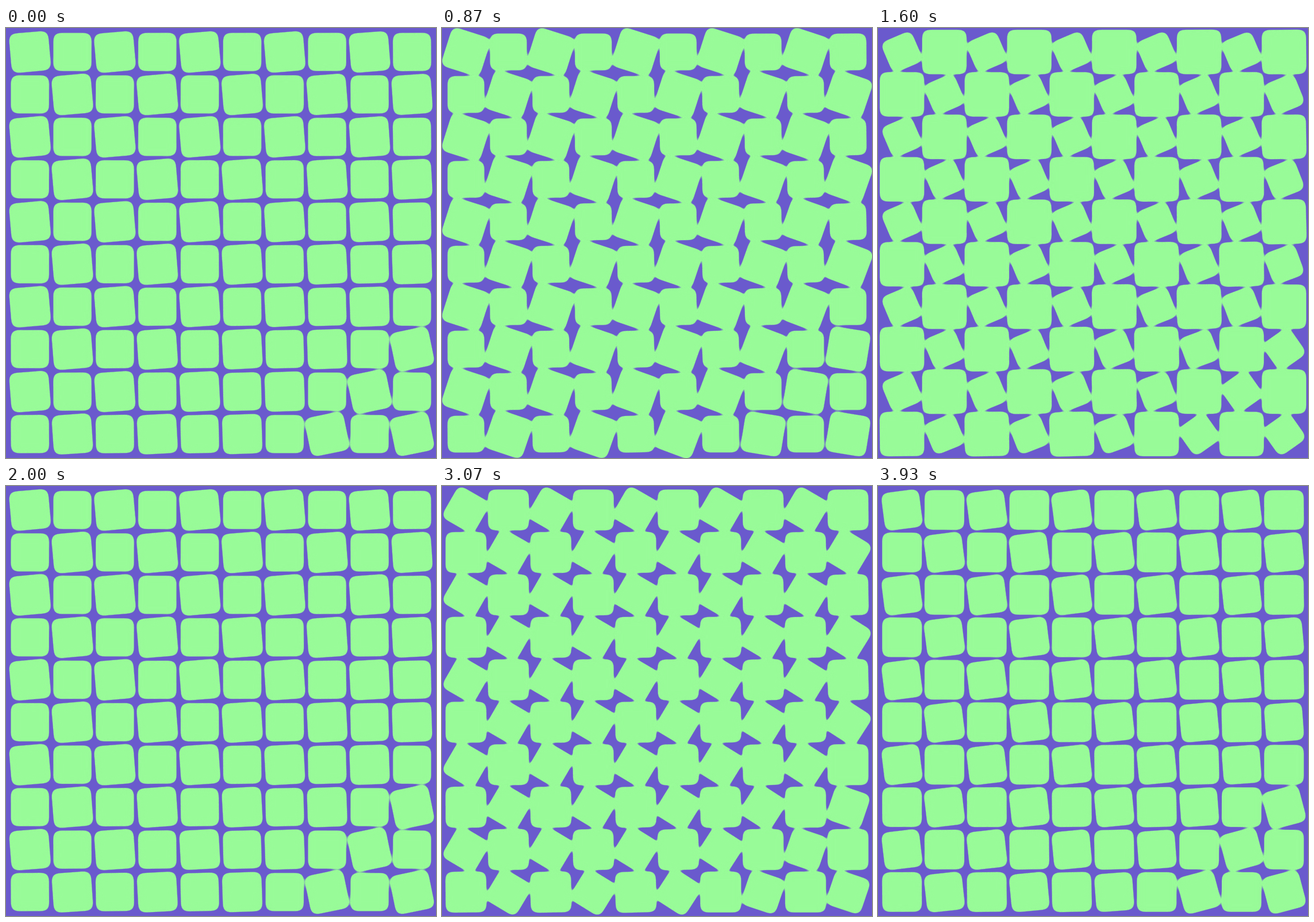
These frames come from a looping animation (748x748 px, 4 s). An HTML page:

```html
<!DOCTYPE html>
<html lang="en">
<head>
<meta charset="utf-8">
<title>Gooey tiles</title>
<style>
  html, body {
    margin: 0;
    width: 100%;
    height: 100%;
    overflow: hidden;
    background: #6a5acd;
  }
  svg { display: block; width: 100%; height: 100%; }
  rect {
    fill: #98fb98;
    transform-box: fill-box;
    transform-origin: center;
    transform: rotate(var(--tilt));
    animation: pulse 1s ease-in-out -1530ms infinite alternate;
  }
  .turning {
    animation:
      pulse 1s ease-in-out -530ms infinite alternate,
      turn 2s cubic-bezier(.42, .06, .58, .94) var(--start) infinite;
  }
  @keyframes pulse {
    from { scale: .683; }
    to { scale: 1; }
  }
  @keyframes turn {
    from { rotate: 0deg; }
    to { rotate: 90deg; }
  }
</style>
</head>
<body>
<svg viewBox="0 0 748 748">
  <defs>
    <!-- A low alpha threshold after the blur makes close tiles fuse -->
    <filter id="goo" filterUnits="userSpaceOnUse" x="-30" y="-30" width="808" height="808"
            color-interpolation-filters="sRGB">
      <feGaussianBlur stdDeviation="5"/>
      <feColorMatrix values="1 0 0 0 0  0 1 0 0 0  0 0 1 0 0  0 0 0 20 -1.5"/>
    </filter>
  </defs>
  <g id="tiles" filter="url(#goo)"></g>
</svg>
<script>
  const COUNT = 10, STEP = 73.85, SIZE = 66.2;
  const tiles = document.getElementById('tiles');

  function addTile(row, col) {
    const rect = document.createElementNS('http://www.w3.org/2000/svg', 'rect');
    const place = i => 374 + (i - (COUNT - 1) / 2) * STEP - SIZE / 2;
    const diagonal = row + col;
    const turning = diagonal % 2 === 0;
    const late = diagonal > 14;
    const lean = late ? 0 : (diagonal / 14) ** 3;

    rect.setAttribute('x', place(col));
    rect.setAttribute('y', place(row));
    rect.setAttribute('width', SIZE);
    rect.setAttribute('height', SIZE);
    rect.style.setProperty('--tilt', lean * (turning ? 3 : -1.8) + 'deg');
    rect.style.setProperty('--start', (late ? -1535 : -1715) + 'ms');
    if (turning) rect.classList.add('turning');
    tiles.append(rect);
  }

  for (let row = 0; row < COUNT; row++)
    for (let col = 0; col < COUNT; col++) addTile(row, col);
</script>
</body>
</html>
```
